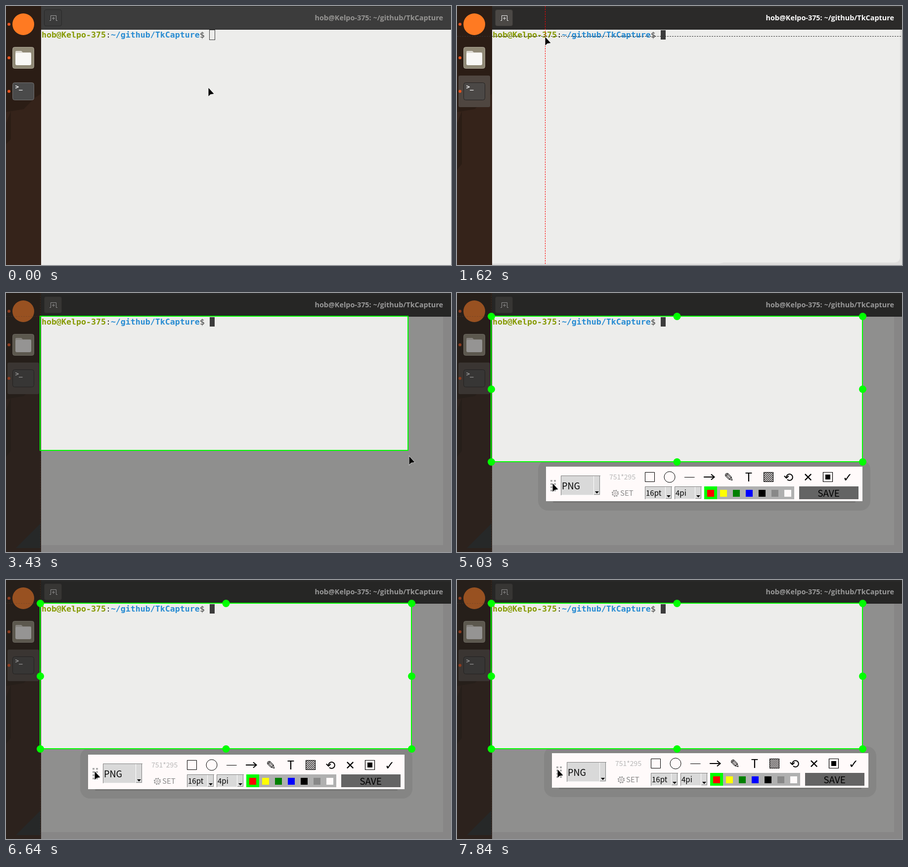
Recreate the animation shown at these times as an HTML page. Size 900 px wide and 525 px high, loop 8 s.

```html
<!DOCTYPE html>
<html lang="en">
<head>
<meta charset="utf-8">
<title>Screen capture tool</title>
<style>
html, body { margin: 0; width: 100%; height: 100%; overflow: hidden; background: #ededeb; }
svg { display: block; width: 100vw; height: 100vh; }
text { white-space: pre; }
.mono { font: bold 16.6px "DejaVu Sans Mono", monospace; }
.ui { font-family: "Noto Sans CJK SC", "Noto Sans CJK JP", "Noto Sans CJK", "Noto Sans", sans-serif; }
.glyph { font-family: "DejaVu Sans", sans-serif; }
.title { font: bold 14.4px "Open Sans", sans-serif; }
.line { fill: none; stroke: #000; }
.plain { fill: #3b3b3b; font-weight: normal; }
</style>
</head>
<body>
<svg viewBox="0 0 900 525" preserveAspectRatio="none">
  <defs>
    <clipPath id="inside"><path id="clipIn"/></clipPath>
    <clipPath id="outside"><path id="clipOut" clip-rule="evenodd"/></clipPath>
  </defs>

  <!-- dock -->
  <rect width="71" height="525" fill="#35231a"/>
  <path d="M0 0H71V178L58 186L36 209L0 215Z" fill="#2b1d15"/>
  <path id="facet" fill="#2b1d15"/>
  <path id="corner" d="M20 517L70 467V517Z" fill="#2a2f2f"/>
  <rect id="active" x="3" y="141" width="64" height="64" rx="3" fill="#4f4640"/>
  <g fill="#e95420">
    <circle cx="6" cy="37" r="3"/><circle cx="6" cy="105" r="3"/><circle cx="6" cy="173" r="3"/>
  </g>
  <circle cx="35" cy="37" r="22" fill="#ff7a22"/>
  <rect x="13.5" y="83.5" width="43" height="43" rx="4" fill="#8f8875" stroke="#aca696"/>
  <path d="M19 97V93Q19 91 21 91H31L34 94H49Q51 94 51 96V97Z" fill="#dcd8d0"/>
  <rect x="19" y="95" width="32" height="25" rx="3" fill="#f8f7f5"/>
  <rect id="term" x="13.5" y="155.5" width="43" height="35" rx="4"/>
  <text class="mono" x="18.5" y="168" fill="#fff" style="font-size:12.5px">&gt;_</text>

  <!-- terminal window -->
  <rect id="bar" x="71" width="829" height="48"/>
  <rect x="71" width="829" height="1" fill="#252423"/>
  <rect x="71" y="1" width="829" height="1" fill="#4a4a4a" opacity=".7"/>
  <rect x="71" y="47" width="829" height="1" fill="#222"/>
  <rect id="button" x="77.5" y="7.5" width="35" height="33" rx="3.5"/>
  <path id="tabIcon" d="M88 29.5H90.5V19.5H101.5V29.5H104M96 22V28M93 25H99" fill="none"/>
  <text id="title" class="title" x="884" y="29" text-anchor="end">hob@Kelpo-375: ~/github/TkCapture</text>
  <rect x="71" y="48" width="829" height="477" fill="#ededeb"/>
  <path id="edge" fill="#dedddc" fill-rule="evenodd"/>
  <text class="mono" x="72" y="64" fill="#859900">hob@Kelpo-375<tspan class="plain">:</tspan><tspan fill="#268bd2">~/github/TkCapture</tspan><tspan class="plain">$</tspan></text>
  <rect id="caret" stroke="#3b3b3b"/>

  <!-- capture overlay -->
  <g id="cross" fill="none" stroke-dasharray="3 2">
    <path id="crossH" stroke="#333"/>
    <path id="crossV" stroke="#f00"/>
  </g>
  <g id="overlay">
    <path id="dim" fill="#222" fill-opacity=".464" fill-rule="evenodd"/>
    <path d="M0 47.5H70M69.5 0V525" stroke="#5a3a2c" stroke-dasharray="3 2" opacity=".4"/>
    <g id="shadow">
      <g clip-path="url(#outside)"><g class="follow">
        <rect x="-16" y="-14" width="672" height="103" rx="20" fill-opacity=".07"/>
        <rect x="14" y="70" width="612" height="3" rx="2" fill-opacity=".12"/>
      </g></g>
      <g clip-path="url(#inside)"><g class="follow">
        <rect x="-5" y="-2" width="650" height="80" rx="14" fill="#d5d5d3"/>
      </g></g>
    </g>
    <path id="frame" fill="none" stroke="#0f0" stroke-width="2"/>
    <g id="handles" fill="#0f0"></g>
  </g>
  <g id="tool" class="ui follow"></g>
  <path id="mouse" d="M.5 0V17L4.5 13 11.5 12Z" stroke="#fff" stroke-width="1.2" stroke-opacity=".85" paint-order="stroke"/>
</svg>
<script>
const LOOP = 8000, TICK = 201.2;
// Ticks at which each stage begins
const FOCUS = 3, CROSS = 6, DRAG = 13, DONE = 19, MOVE = 27;
const PAUSES = [2, 5, 12, 26];

const $ = id => document.getElementById(id);
const set = (id, attrs) => { for (const k in attrs) $(id).setAttribute(k, attrs[k]); };
const show = (id, on) => set(id, { display: on ? "inline" : "none" });
const box = (x, y, w, h, fill) =>
  `<rect x="${x}" y="${y}" width="${w}" height="${h}" fill="${fill}"/>`;
const label = (x, y, size, fill, s, extra = "") =>
  `<text x="${x}" y="${y}" font-size="${size}" fill="${fill}" ${extra}>${s}</text>`;
const stroke = (d, w = 1) => `<path class="line" d="${d}" stroke-width="${w}"/>`;
const square = x => `M${x + .5} 11.5h19v19h-19Z`;

// Turning points of the pointer: tick, x, y
const route = [
  [0, 409, 166], [1, 249, 142], [8, 178, 63], [11, 69, 48], [13, 110, 70],
  [17, 815, 331], [19, 820, 343], [24, 217, 384], [25, 193, 386], [26, 193, 386],
  [28, 265, 222], [29, 227, 240], [31, 160, 374], [32, 178, 388], [33, 179, 388],
  [37, 212, 388], [39, 203, 384]
];

function pointer(n) {
  const i = Math.max(1, route.findIndex(p => p[0] >= n));
  const [a, ax, ay] = route[i - 1], [b, bx, by] = route[i];
  const k = (n - a) / (b - a);
  return [Math.round(ax + (bx - ax) * k), Math.round(ay + (by - ay) * k)];
}

// The panel hangs on the pointer by its grip and trails a little
function panel(n) {
  const [x, y] = pointer(n < MOVE ? 25 : n - .4);
  return [x - 13, y - 34];
}

function corner(n, mx, my) {
  return n >= DONE ? [820, 342] : [Math.min(mx - 2, 820), my - 12];
}

function combo(x, y, w, h, size, base, s) {
  const r = x + w, b = y + h;
  return box(x, y, w, h, "#d9d9d9") +
    `<g fill="none" stroke="#828282"><path d="M${x} ${b - .5}H${r - .5}V${y}" stroke="#f4f4f4"/>` +
    `<path d="M${x + .5} ${b}V${y + .5}H${r}"/><path d="M${r - 13.5} ${b - 1}V${y + 1}" stroke="#fff"/>` +
    `<path d="M${r - 1.5} ${y + 1}V${b - 1.5}H${r - 13}"/></g>` +
    `<path d="M${r - 11} ${b - 8}h8l-4 4.5Z"/>` +
    label(x + 2, base, size, "#000", s, 'font-weight="500"');
}

function buildTool() {
  let s = box(0, 0, 640, 70, "#fffafa");
  for (let i = 0; i < 8; i++) s += box(9 + i % 2 * 7, 27 + (i >> 1) * 6.5, 4, 3.5, "#aaa");
  s += combo(30, 18, 80, 40, 18, 46, "PNG");
  s += label(128, 26, 14, "#b8b8b8", "751*295");
  s += '<g fill="none" stroke="#8c8c8c"><circle cx="140" cy="54" r="5"/><circle cx="140" cy="54" r="2"/>' +
    '<circle cx="140" cy="54" r="6.3" stroke-width="1.6" stroke-dasharray="2.5 2.45"/></g>';
  s += label(150, 59, 15, "#888", "SET");

  // drawing tools, 40 px apart
  s += stroke(square(200));
  s += '<circle class="line" cx="250" cy="21" r="11"/>';
  s += stroke("M280 21.5H300.5");
  s += stroke("M319 21H340M334 15.5L340.5 21L334 26.5", 2);
  let hatch = square(440);
  for (let k = 4; k < 38; k += 4) {
    const a = Math.min(k, 19), b = k - a;
    hatch += `M${440.5 + a} ${11.5 + b}L${440.5 + b} ${11.5 + a}`;
  }
  s += stroke(hatch, 1.1);
  s += stroke(square(560), 1.2) + box(565, 16, 10, 10, "#000");
  [..."✎T ⟲✕ ✓"].forEach((c, i) => {
    const type = c === "T" ? 'font-weight="500"' : 'class="glyph"';
    s += label(370 + i * 40, 30, 24, "#000", c, `text-anchor="middle" ${type}`);
  });

  s += combo(200, 40, 55, 26, 15, 59, "16pt") + combo(260, 40, 55, 26, 15, 59, "4pi");
  s += box(320, 40, 182, 26, "#b0b0b0") + box(320, 40, 26, 26, "#0f0");
  ["#f00", "#ff0", "#008000", "#00f", "#000", "#888", "#fffafa"].forEach((c, i) => {
    s += box(326 + i * 26, 47, 14, 14, c);
  });
  s += box(512, 40, 120, 26, "#646464");
  s += label(571.5, 61, 19, "#000", "SAVE", 'text-anchor="middle"');
  $("tool").innerHTML = s;
}

function buildHandles() {
  for (let i = 0; i < 9; i++) if (i !== 4)
    $("handles").innerHTML += `<circle cx="${69.5 + i % 3 * 375.5}" cy="${47.5 + (i / 3 | 0) * 147.5}" r="7.5"/>`;
}

function render(t) {
  let n = Math.floor((t + 8) / TICK);
  if (PAUSES.includes(n)) n--;
  const focus = n >= FOCUS, frozen = n >= CROSS, dimmed = n >= DRAG, done = n >= DONE;
  const [mx, my] = pointer(n);
  set("mouse", { transform: `translate(${mx} ${my})` });

  // window focus
  set("bar", { fill: focus ? "#2b2a29" : "#3c3c3c" });
  set("title", { fill: focus ? "#fff" : "#969593" });
  set("button", { fill: focus ? "#4b4845" : "#3a3a3a", stroke: focus ? "#393634" : "#292929" });
  set("tabIcon", { stroke: focus ? "#f0f0f0" : "#a2a2a2" });
  set("term", { fill: focus ? "#4b4846" : "#4a4a4a", stroke: focus ? "#252322" : "#727272" });
  set("caret", focus
    ? { x: 412.5, y: 49.5, width: 9, height: 18, fill: "#3b3b3b" }
    : { x: 411.5, y: 48.5, width: 11, height: 20, fill: "none" });
  show("active", focus);
  set("facet", { d: `M0 238L10 213V${frozen ? 320 : 270}L0 ${frozen ? 332 : 280}Z` });
  show("corner", dimmed);
  show("edge", frozen);
  set("edge", { d: "M71 48H900V525H71Z" + (dimmed
    ? "M71 48H884V511H71Z"
    : "M71 48H896V508Q896 520 884 520H540L530 522H71Z") });

  // crosshair
  show("cross", frozen && !dimmed);
  set("crossH", { d: `M0 ${my - 1.5}H900` });
  set("crossV", { d: `M${mx + .5} 0V525` });

  // selection
  show("overlay", dimmed);
  const [x, y] = corner(n, mx, my);
  const sel = `M69 47H${x}V${y}H69Z`, rest = "M0 0H900V525H0Z" + sel;
  set("frame", { d: sel });
  set("clipIn", { d: sel });
  set("clipOut", { d: rest });
  set("dim", { d: rest });

  // toolbar
  for (const id of ["handles", "shadow", "tool"]) show(id, done);
  const move = `translate(${panel(n)})`;
  document.querySelectorAll(".follow").forEach(e => e.setAttribute("transform", move));
}

buildTool();
buildHandles();
const begin = performance.now();
function tick() {
  render((performance.now() - begin) % LOOP);
  requestAnimationFrame(tick);
}
tick();
</script>
</body>
</html>
```
